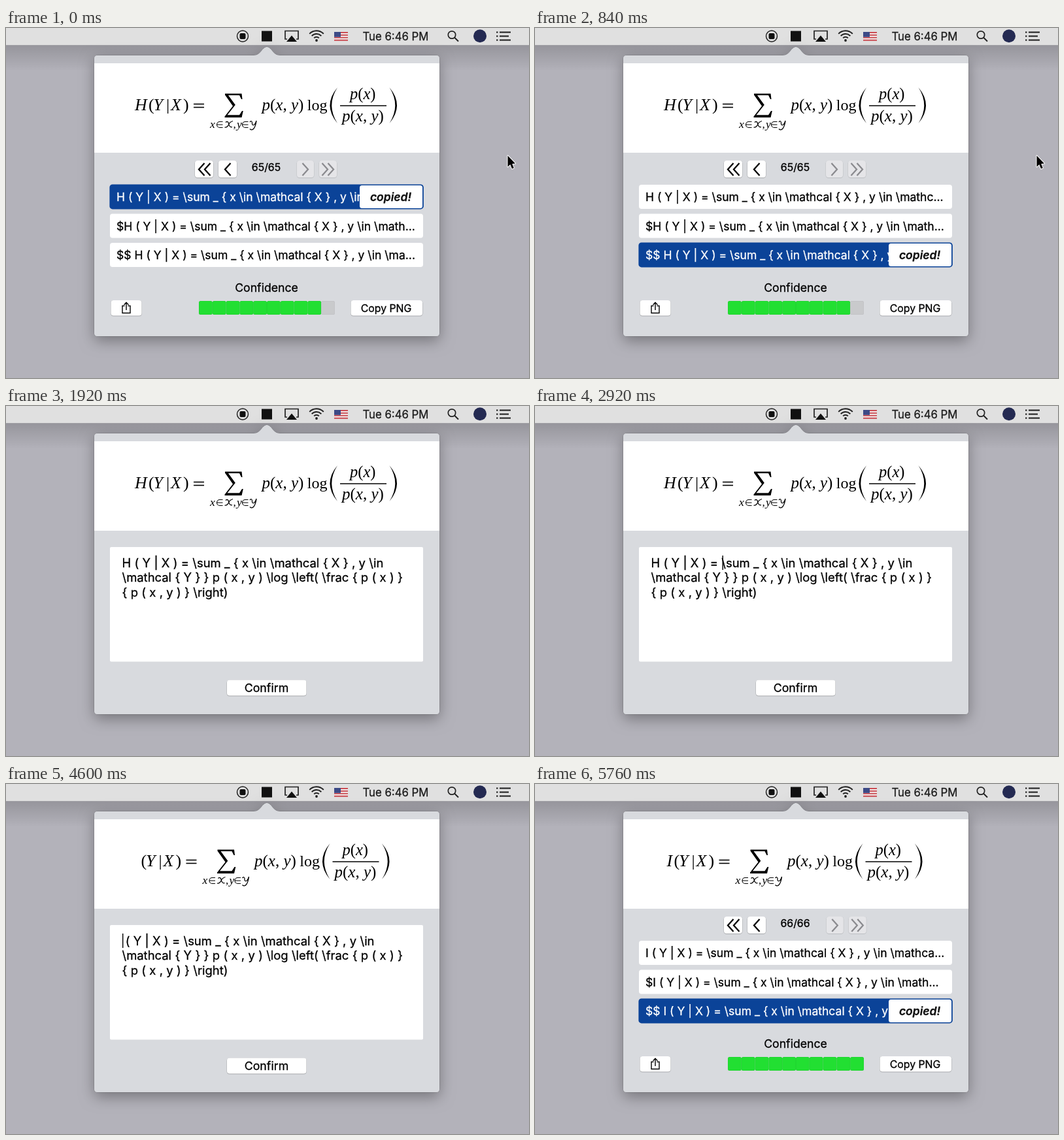
Animation of 800x536 px, one loop 5.8 s. Source, as an HTML page with a canvas:

```html
<!DOCTYPE html>
<html lang="en">
<head>
<meta charset="utf-8">
<title>Equation editor</title>
<style>
html, body { margin: 0; width: 100%; height: 100%; overflow: hidden; background: #b3b2ba; }
canvas { display: block; width: 800px; height: 536px; }
</style>
</head>
<body>
<canvas id="stage"></canvas>
<script>
const W = 800, H = 536, LOOP = 5800;
const SANS = 'Inter, "Open Sans", sans-serif';
const SERIF = '"Liberation Serif", "Noto Serif", serif';
const BLUE = '#0b4398', PANEL = '#d8dade', INK = '#000';

// Moments of the story, in ms
const SECOND_ROW = 360, THIRD_ROW = 680, EDIT = 920, HIDE_POINTER = 1560;
const DELETE = 4240, RETYPE = 4720, RESULT = 5080, ENABLE = 5400;

// Caret: time, x, line; no x means hidden
const CARET = [
  [EDIT, 341, 2], [1400], [1560, 336, 1], [1920], [2000, 336, 0], [2360],
  [2600, 293, 0], [2920, 287, 0], [3280], [3360, 240, 0], [3480, 209, 0],
  [3640, 178, 0], [3920, 191, 0], [DELETE, 178.5, 0], [RETYPE, 184.5, 0]
];

const canvas = document.getElementById('stage');
const ctx = canvas.getContext('2d');
const dpr = window.devicePixelRatio || 1;
canvas.width = W * dpr;
canvas.height = H * dpr;

function text(str, x, y, size, { color = INK, align = 'left', style = '', family = SANS, gap = 0 } = {}) {
  ctx.font = `${style} ${size}px ${family}`;
  ctx.textAlign = align;
  ctx.wordSpacing = gap + 'px';
  ctx.fillStyle = color;
  ctx.fillText(str, x, y);
  if (family === SANS) {
    // Slightly fuller letters, like smoothed screen type
    ctx.lineWidth = 0.3;
    ctx.strokeStyle = color;
    ctx.strokeText(str, x, y);
  }
}

function box(x, y, w, h, r, color) {
  ctx.beginPath();
  ctx.roundRect(x, y, w, h, r);
  ctx.fillStyle = color;
  ctx.fill();
}

function dot(x, y, r, color) {
  ctx.beginPath();
  ctx.arc(x, y, r, 0, Math.PI * 2);
  ctx.fillStyle = color;
  ctx.fill();
}

function trace(points, close) {
  ctx.beginPath();
  points.forEach(([x, y]) => ctx.lineTo(x, y));
  if (close) ctx.closePath();
}

function line(points, width, color = INK) {
  trace(points);
  ctx.lineWidth = width;
  ctx.strokeStyle = color;
  ctx.stroke();
}

function shape(points, color = INK) {
  trace(points, true);
  ctx.fillStyle = color;
  ctx.fill();
}

function strokePath(d, width, color = INK) {
  ctx.lineWidth = width;
  ctx.strokeStyle = color;
  ctx.stroke(new Path2D(d));
}

function button(x, y, w, h, enabled) {
  box(x - 0.5, y, w + 1, h + 1, 4.5, enabled ? 'rgba(0,0,0,.22)' : 'rgba(0,0,0,.12)');
  box(x, y, w, h, 4, enabled ? '#fff' : '#e5e5e8');
}

function desktop() {
  ctx.fillStyle = '#b3b2ba';
  ctx.fillRect(0, 0, W, H);
  const shade = ctx.createLinearGradient(0, 27, 0, 66);
  shade.addColorStop(0, 'rgba(0,0,0,.16)');
  shade.addColorStop(1, 'rgba(0,0,0,0)');
  ctx.fillStyle = shade;
  ctx.fillRect(0, 27, W, 39);
}

function menuBar() {
  ctx.fillStyle = '#e0e0e0';
  ctx.fillRect(0, 0, W, 26);
  ctx.fillStyle = '#a09fa5';
  ctx.fillRect(0, 26, W, 1);

  ctx.beginPath();
  ctx.arc(362, 12.5, 8.5, 0, Math.PI * 2);
  ctx.lineWidth = 1.5;
  ctx.strokeStyle = '#222';
  ctx.stroke();
  box(357.5, 8, 9, 9, 2, '#111');

  box(391, 4.5, 16, 16, 0, '#111');

  strokePath('M430 17H427V4.5H447V17H444', 1.7, '#222');
  shape([[437, 11.5], [445, 21], [429, 21]], '#111');

  for (const r of [5.2, 10, 14.8]) {
    ctx.beginPath();
    ctx.arc(475, 19, r, -Math.PI * 0.76, -Math.PI * 0.24);
    ctx.lineWidth = 1.9;
    ctx.strokeStyle = '#222';
    ctx.stroke();
  }
  dot(475, 19, 1.9, '#222');

  for (let i = 0; i < 7; i++) {
    ctx.fillStyle = i % 2 ? '#f4eeee' : '#c9454c';
    ctx.fillRect(502, 6 + i * 1.95, 21, 1.95);
  }
  ctx.fillStyle = '#3c4a86';
  ctx.fillRect(502, 6, 10, 7.8);

  text('Tue 6:46 PM', 545.5, 18.5, 16.75, { color: '#1c1c1c' });

  ctx.beginPath();
  ctx.arc(682, 10.5, 5.7, 0, Math.PI * 2);
  ctx.lineWidth = 1.7;
  ctx.strokeStyle = '#222';
  ctx.stroke();
  line([[686, 14.5], [692, 20.5]], 2, '#222');

  dot(725, 12.3, 10, '#242a52');

  for (const y of [6.5, 12.5, 18.5]) {
    ctx.fillStyle = '#1c1c1c';
    ctx.fillRect(750, y - 1, 2.5, 2);
    ctx.fillRect(755, y - 1, y === 12.5 ? 14 : 17, 2);
  }
}

function panel() {
  const outline = new Path2D(
    'M140 42H379C386 42 389 37 393 32.5Q399 25.5 405 32.5C409 37 412 42 419 42H658' +
    'Q663 42 663 47V467Q663 472 658 472H140Q135 472 135 467V47Q135 42 140 42Z');
  ctx.save();
  ctx.shadowColor = 'rgba(0,0,0,.34)';
  ctx.shadowBlur = 22 * dpr;
  ctx.shadowOffsetY = 7 * dpr;
  ctx.fillStyle = PANEL;
  ctx.fill(outline);
  ctx.restore();
  ctx.lineWidth = 1;
  ctx.strokeStyle = 'rgba(0,0,0,.2)';
  ctx.stroke(outline);
  ctx.fillStyle = PANEL;
  ctx.fill(outline);
  ctx.fillStyle = '#fff';
  ctx.fillRect(135, 54, 528, 137);
}

// Letters in italics, everything else upright
function math(str, x, y, size) {
  for (const ch of str) {
    const style = /[a-zA-Z]/.test(ch) ? 'italic' : '';
    text(ch, x, y, size, { style, family: SERIF });
    x += ctx.measureText(ch).width;
  }
}

function element(x) {
  strokePath(`M${x + 9.5} 143.5H${x + 5}A4.5 4.5 0 0 0 ${x + 5} 152.5H${x + 9.5}M${x + 0.8} 148H${x + 9.5}`, 1.1);
}

function bigParen(tip, mid) {
  const outer = mid * 2 - tip, inner = outer + Math.sign(tip - mid) * 5.5;
  ctx.fillStyle = INK;
  ctx.fill(new Path2D(`M${tip} 91Q${outer} 118.5 ${tip} 146Q${inner} 118.5 ${tip} 91Z`));
}

function formula(head) {
  const shift = { H: 0, I: -5.5, '': -11.5 }[head];
  if (head) math(head, head === 'H' ? 197 : 201.5, 125.5, 26);
  ctx.save();
  ctx.translate(shift, 0);
  [['(', 218], ['Y', 225.5], ['|', 245], ['X', 252], [')', 271]]
    .forEach(([ch, x]) => math(ch, x, 125.5, 26));
  line([[287, 116.5], [303, 116.5]], 1.6);
  line([[287, 121.5], [303, 121.5]], 1.6);

  shape([[335, 100.5], [360.5, 100.5], [361.5, 109], [360, 109], [357, 103], [340, 103],
    [350.8, 117.8], [338.5, 133.3], [357, 133.3], [361, 127], [362.8, 127], [360.5, 137],
    [334.5, 137], [334.5, 135.5], [347, 119.5], [335, 102.5]]);

  math('x', 312, 153, 17.5);
  element(322);
  strokePath('M336 144.5Q339 141.5 340.5 146Q342 153 346 151.5M347 142.5Q342 144 340.5 148Q338 153 334.5 152', 1.3);
  math(',', 347.5, 153, 17);
  math('y', 353, 153, 17.5);
  element(361);
  strokePath('M373 144Q376 141 376.5 145Q376 150 380 148Q382 146 383 142M383 142Q382 150 379 154Q376 157.5 373 154.5', 1.3);

  math('p(x, y)', 391.5, 125.5, 25);
  text('log', 460.8, 125.5, 24, { family: SERIF });
  bigParen(507, 495.5);
  math('p(x)', 526, 109, 24.5);
  line([[511, 119], [582, 119]], 1.4);
  math('p(x, y)', 514, 142.5, 25);
  bigParen(586.5, 598);
  ctx.restore();
}

function chevron(x, dir, color) {
  line([[x - dir * 4.5, 207], [x + dir * 4, 216.5], [x - dir * 4.5, 226]], 2.3, color);
}

function navigation(count) {
  const nudge = count === 66 ? 0.8 : 0;
  button(289, 203, 28, 26, true);
  chevron(299, -1, INK);
  chevron(308, -1, INK);
  button(325, 203, 28, 26, true);
  chevron(339, -1, INK);
  text(`${count}/${count}`, 398, 219, 15.9, { align: 'center' });
  ctx.save();
  ctx.translate(nudge, 0);
  button(445, 203, 26, 26, false);
  chevron(458, 1, '#8b8b8f');
  button(479, 203, 27, 26, false);
  chevron(488, 1, '#8b8b8f');
  chevron(497, 1, '#8b8b8f');
  ctx.restore();
}

function row(y, str, cut, selected) {
  if (selected) box(158.4, y - 0.6, 480.4, 38, 4.5, BLUE);
  else box(159, y, 479, 37, 4, '#fff');
  ctx.save();
  ctx.beginPath();
  ctx.rect(159, y, selected ? 382 : 479, 37);
  ctx.clip();
  text(selected ? str : str.slice(0, cut) + '...', 169, y + 25, 17.55,
    { color: selected ? '#fff' : INK });
  ctx.restore();
  if (selected) {
    box(541, y + 1, 96, 35, 3.5, '#fff');
    text('copied!', 588.5, y + 24.5, 17.5, { style: 'italic 600', align: 'center', color: '#111' });
  }
}

function results(head, picked, enabled) {
  const first = head === 'H';
  const code = head + ' ( Y | X ) = \\sum _ { x \\in \\mathcal { X } , y \\in \\mathcal { Y } }';
  const cutAt = part => code.indexOf(part, code.indexOf('y \\in')) + part.length;
  navigation(first ? 65 : 66);
  row(240, code, cutAt(first ? '\\mathc' : '\\mathca'), picked === 0);
  row(284.5, '$' + code, cutAt('\\math') + 1, picked === 1);
  row(329, '$$ ' + code, cutAt('\\ma') + 3, picked === 2);

  text('Confidence', 398.5, 404, 17.65, { align: 'center' });
  for (let i = 0; i < 10; i++) {
    const x = 295 + i * 20.8, on = !first || i < 9;
    box(x, 418, 20.8, 21, 2.5, on ? '#1fce30' : '#bcbdc0');
    box(x + 0.4, 418.4, 20, 20.2, 2.5, on ? '#22df32' : '#c9cacc');
  }

  const ink = enabled ? INK : '#a4a4a8';
  button(160.5, 417, 47, 23.5, enabled);
  strokePath('M181.5 425.5H178V436.5H190V425.5H186.5M184 432V420.5M180.5 424L184 420.3L187.5 424', 1.4, ink);
  button(527.5, 417, 109.5, 23.5, enabled);
  text('Copy PNG', 581.5, 434.7, 15.8, { align: 'center', color: ink });
}

function latest(list, t) {
  return list.filter(([at]) => at <= t).pop();
}

function editor(head, t) {
  box(159, 216, 479, 175.5, 2, '#fff');
  const lines = [
    ' ( Y | X ) = \\sum _ { x \\in \\mathcal { X } , y \\in',
    '\\mathcal { Y } } p ( x , y ) \\log \\left( \\frac { p ( x ) }',
    '{ p ( x , y ) } \\right)'
  ];
  lines[0] = head + lines[0];
  lines.forEach((str, i) => text(str, 177.5, 247 + i * 22.3, 18.43, { gap: 0.15 }));
  const [, x, at] = latest(CARET, t);
  if (x) {
    ctx.fillStyle = INK;
    ctx.fillRect(x - 0.5, 229 + at * 22.3, 1.4, 22);
  }
  button(338, 419.5, 121.5, 24, true);
  text('Confirm', 398.5, 438, 17.8, { align: 'center' });
}

function pointer() {
  const outline = [[767.5, 195.5], [767.5, 212.5], [771.3, 209], [774, 215.5], [776.8, 214.3],
    [774.2, 208], [779, 207.5]];
  trace(outline, true);
  ctx.lineWidth = 2;
  ctx.strokeStyle = '#fff';
  ctx.lineJoin = 'round';
  ctx.stroke();
  ctx.lineJoin = 'miter';
  shape(outline);
}

function draw(t) {
  ctx.setTransform(dpr, 0, 0, dpr, 0, 0);
  desktop();
  menuBar();
  panel();

  const head = t < DELETE ? 'H' : t < RETYPE ? '' : 'I';
  formula(head);
  if (t >= EDIT && t < RESULT) {
    editor(head, t);
  } else {
    const picked = t < SECOND_ROW ? 0 : t < THIRD_ROW ? 1 : 2;
    results(head, picked, t < EDIT || t >= ENABLE);
  }
  if (t < HIDE_POINTER) pointer();
}

const start = performance.now();
function tick() {
  draw((performance.now() - start) % LOOP);
  requestAnimationFrame(tick);
}
tick();
</script>
</body>
</html>
```
